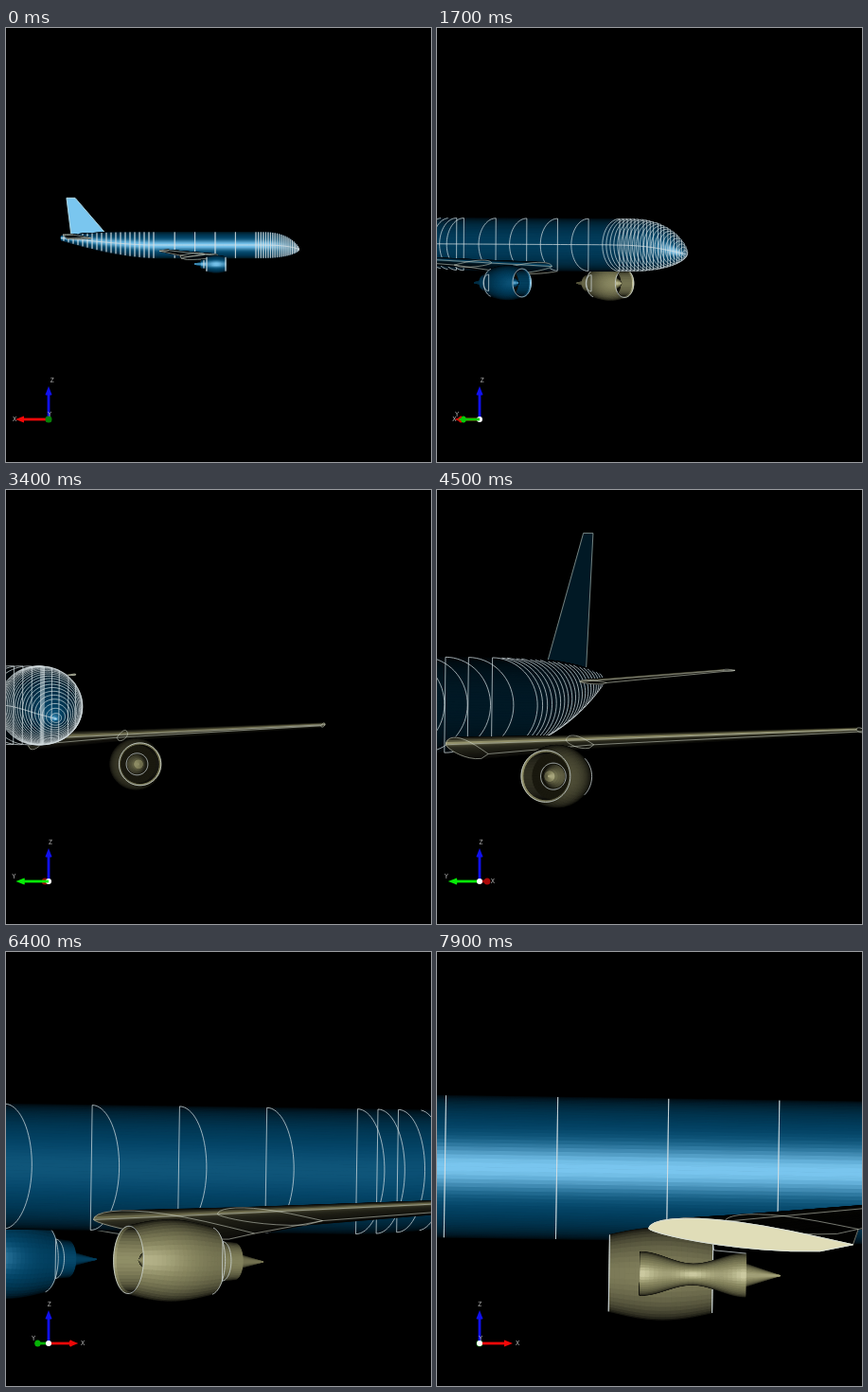
These frames come from a looping animation (449 px wide and 458 px high, 8 s). An HTML page with a canvas:

```html
<!DOCTYPE html>
<html>
<head>
<meta charset="utf-8">
<style>
html, body { margin: 0; width: 100%; height: 100%; overflow: hidden; background: #000; }
canvas { display: block; }
</style>
</head>
<body>
<canvas id="stage" width="449" height="458"></canvas>
<script>
const ctx = document.getElementById('stage').getContext('2d');
const W = 449, H = 458, TAU = Math.PI * 2;
const LINE = 'rgba(215,225,228,.8)', SOFT = 'rgba(215,220,205,.6)';

// A material is a diffuse colour plus a tight highlight, lit from the viewer
const material = (base, shine) => c => {
  c = Math.min(1, Math.abs(c));
  return `rgb(${base.map((b, i) => Math.round(b * c + shine[i] * c ** 20))})`;
};
const BLUE = material([2, 80, 121], [120, 118, 118]);
const SAND = material([152, 150, 106], [55, 55, 58]);
const MATTE = material([122, 120, 86], [10, 10, 8]);
const DARK = material([26, 25, 15], [0, 0, 0]);

let zoom, sn, cs, roll, faces = [];

// Model axes: u to the nose, v to the blue side, z up
function project([u, v, z]) {
  const x = zoom * ((u - 3.5) * cs - (v + 69.8) * sn);
  return [224.5 + x + roll * zoom * z, 229 - zoom * z + roll * x];
}
const depth = ([u, v]) => u * sn + v * cs;
const range = (n, f) => Array.from({ length: n }, (_, i) => f(i));
const minus = (a, b) => a.map((x, i) => x - b[i]);
const cross = (a, b) => [a[1] * b[2] - a[2] * b[1], a[2] * b[0] - a[0] * b[2], a[0] * b[1] - a[1] * b[0]];

function trace(points) {
  ctx.beginPath();
  points.forEach(p => ctx.lineTo(...project(p)));
}
function line(points, color = LINE) {
  trace(points);
  ctx.strokeStyle = color;
  ctx.lineWidth = .9;
  ctx.stroke();
}
function fill(points, color) {
  trace(points);
  ctx.closePath();
  ctx.fillStyle = ctx.strokeStyle = color;
  ctx.lineWidth = 1;
  ctx.fill();
  ctx.stroke();
}

function face(q, paint, cull) {
  const n = cross(minus(q[3], q[1]), minus(q[2], q[0]));
  const c = depth(n) / (Math.hypot(...n) || 1);
  if (cull && c <= 0) return;
  faces.push({ q, color: paint(c), d: q.reduce((s, p) => s + depth(p), 0) });
}
function flush() {
  faces.sort((a, b) => a.d - b.d).forEach(f => fill(f.q, f.color));
  faces = [];
}

// A hoop is [u, half width, centre z, half height]
const onHoop = ([u, r, zc = 0, h = r], t, v0 = 0, z0 = 0) =>
  [u, v0 + r * Math.cos(t), z0 + zc + h * Math.sin(t)];

function revolve(hoops, seg, paint, v0, z0) {
  for (let i = 0; i + 1 < hoops.length; i++)
    for (let j = 0; j < seg; j++) {
      const a = j / seg * TAU, b = (j + 1) / seg * TAU;
      face([onHoop(hoops[i], a, v0, z0), onHoop(hoops[i + 1], a, v0, z0),
        onHoop(hoops[i + 1], b, v0, z0), onHoop(hoops[i], b, v0, z0)], paint, true);
    }
}

// Draws the part of a hoop that faces the viewer
function hoopLine(hoop, slope, v0, z0) {
  const start = cs < 0 ? Math.PI / 2 : -Math.PI / 2;
  const seen = range(73, j => start + j / 72 * TAU)
    .filter(t => Math.cos(t) * cs - slope * sn > -.02);
  if (seen.length > 1) line(seen.map(t => onHoop(hoop, t, v0, z0)));
}

// Fuselage
function body(u) {
  let top = 13.6, bot = -13.8, w = 13.75;
  if (u > 50) {
    const q = Math.min(1, (u - 50) / 39), s = (1 - q ** 2.2) ** .6;
    top = -4.7 + 18.3 * (1 - q ** 2.4) ** .7;
    bot = -4.7 - 9.1 * s;
    w *= s;
  } else if (u < -65) {
    const q = (-65 - u) / 98;
    top -= 4 * q ** 3;
    bot += 19 * q ** 1.6;
    w -= 11.75 * q ** 1.7;
  }
  return [u, w, (top + bot) / 2, (top - bot) / 2];
}
const hull = [...range(21, i => -163 + i * 4.9), ...range(25, i => 50 + 39 * Math.sin(i / 24 * Math.PI / 2))].map(body);
const ribs = [
  ...range(20, i => -160 + i * 5),
  ...range(4, i => (i - 2) * 21.4),
  ...range(23, i => 43 + 46 * (1 - (1 - i / 23) ** 1.35))
];
const seam = range(48, i => body(-163 + i * 252 / 47));

function fuselage() {
  const fin = [[-148, 0, 49.6], [-157, 0, 49.6], [-152, 0, 10], [-116, 0, 12.5]];
  fill(fin, BLUE(cs));
  line([...fin, fin[0]], SOFT);
  revolve(hull, 112, BLUE);
  flush();
  for (const u of ribs) hoopLine(body(u), body(u + .5)[1] - body(u - .5)[1]);
  if (cs > .05) line(seam.map(b => [b[0], b[1], b[0] > 50 ? b[2] : Math.max(0, b[2])]));
}

// Lifting surfaces: sections are [span, leading u, trailing u, leading z, trailing z]
const WING = [[8.5, 3.5, -36, -11.5, -14], [40, -11.2, -37, -9.9, -11], [115.2, -49, -59, -5.8, -6.2]];
const STAB = [[5, -131, -156, 7, 6.8], [42, -150, -161, 10.8, 10.8]];

function airfoil([w, u0, u1, z0, z1], side, thick = 1) {
  const n = 12, size = thick * (u0 - u1) / 40;
  return range(2 * n + 1, i => {
    const x = ((i - n) / n) ** 2;
    const bump = i < n ? 7.5 * Math.sqrt(x) * (1 - x) ** 1.1 : -5.5 * x ** .7 * (1 - x) ** .55;
    return [u0 + (u1 - u0) * x, side * w, z0 + (z1 - z0) * x + size * bump];
  });
}
function loft(sections, side, paint, thick) {
  const outlines = sections.map(s => airfoil(s, side, thick));
  for (let i = 0; i + 1 < outlines.length; i++) {
    const a = outlines[i], b = outlines[i + 1];
    for (let j = 0; j + 1 < a.length; j++) face([a[j], b[j], b[j + 1], a[j + 1]], paint);
  }
  flush();
  outlines.forEach(o => line(o, SOFT));
  [0, 12].forEach(j => line(outlines.map(o => o[j]), SOFT));
}

// Engines
const cowl = range(21, i => [i - 9, 7.4 + 1.5 * Math.sin(i / 20 * Math.PI)]);
const nozzle = [[-22, 0], [-15, 1.8], [-15, 4], [-9, 4.6]];
const duct = [[11, 7.4], [10.6, 7], [3, 6.9]];
const fan = [[3, 6.9], [3, 3]];
const spinner = range(6, i => [3.5 + i, 3.2 * Math.sqrt(1 - i / 5)]);
const core = [[-22, 0], [-15.4, 2.2], ...range(25, i => [-15.4 + i * .85, 3.1 + 1.1 * Math.cos(i / 24 * TAU)]), [5, 0]];

function engine(side, paint, open) {
  const v = side * 41.2, z = -20.2;
  const turn = (hoops, look = paint) => revolve(hoops, 48, look, v, z);
  if (!open) {
    turn(nozzle);
    turn(duct);
    turn(fan, DARK);
    turn(spinner);
  }
  turn(cowl, open ? MATTE : paint);
  flush();
  hoopLine([11, 7.4], sn > .3 ? -9 : 0, v, z);
  hoopLine([-9, 7.4], .24, v, z);
  if (open) {
    turn(core);
    flush();
    line([[1, v, -12.3], [-8.5, v, -12.3], [-9.2, v, -15.5], [-15.4, v, -16]]);
  } else if (Math.abs(cs) > .7) hoopLine([-12, 4.3], 0, v, z);
  else hoopLine([4, 3.8], -9, v, z);
}

function plane(open) {
  const near = cs >= 0 ? 1 : -1;
  const paint = s => s > 0 ? BLUE : SAND;
  const stab = s => loft(STAB, s, paint(s), .35);
  const wing = s => loft(WING, s, paint(s));
  const stabInFront = Math.abs(cs) > .12;
  stab(-near);
  wing(-near);
  if (!open) engine(-near, paint(-near));
  if (!stabInFront) stab(near);
  fuselage();
  if (stabInFront) stab(near);
  if (open) {
    engine(near, SAND, true);
    loft(WING, near, DARK);
    const root = airfoil(WING[0], near);
    fill(root, '#e0ddb8');
    line(root);
  } else {
    wing(near);
    engine(near, paint(near));
  }
}

// Axis marker
function arrow(dx, dy, toward, color) {
  const ox = 45, oy = 413, bx = ox + dx * 26, by = oy + dy * 26;
  ctx.strokeStyle = ctx.fillStyle = color;
  ctx.lineWidth = 2.8;
  ctx.beginPath();
  ctx.moveTo(ox, oy);
  ctx.lineTo(bx, by);
  ctx.stroke();
  ctx.beginPath();
  ctx.moveTo(ox + dx * 35, oy + dy * 35);
  ctx.lineTo(bx - dy * 3.5, by + dx * 3.5);
  ctx.lineTo(bx + dy * 3.5, by - dx * 3.5);
  ctx.fill();
  ctx.beginPath();
  ctx.ellipse(bx, by, dy ? 3.5 : 3.5 * Math.abs(toward), dy ? .5 : 3.5, 0, 0, TAU);
  ctx.fill();
}
function triad(turned) {
  const parts = [
    [-sn, () => arrow(-cs, 0, sn, `rgb(${140 + 105 * Math.abs(cs)},8,8)`)],
    [cs, () => arrow(-sn, 0, cs, `rgb(6,${130 + 110 * sn},6)`)],
    [-.01, () => arrow(0, -1, 0, '#1010f0')],
    [0, () => {
      ctx.fillStyle = '#fff';
      ctx.beginPath();
      ctx.arc(45, 413, 3, 0, TAU);
      ctx.fill();
    }]
  ];
  parts.sort((a, b) => a[0] - b[0]).forEach(p => p[1]());
  ctx.fillStyle = '#b4b4b4';
  ctx.font = '7px "DejaVu Sans Mono", monospace';
  ctx.textAlign = 'center';
  ctx.textBaseline = 'middle';
  if (Math.abs(cs) > .2) ctx.fillText('X', 47 - 38 * cs, 413);
  ctx.fillText('Y', 46 - 38 * sn, 408.5);
  ctx.fillText('Z', 48.5 - 3.4 * turned, 372.5);
}

function draw() {
  const step = Math.floor(performance.now() % 8000 / 100);
  const n = Math.min(step, 75), a = n / 75 * Math.PI;
  zoom = 1 + n * .0596;
  sn = Math.sin(a);
  cs = Math.cos(a);
  roll = .015 * Math.sin(a / 2);
  ctx.fillStyle = '#000';
  ctx.fillRect(0, 0, W, H);
  ctx.lineJoin = 'round';
  plane(step >= 79);
  triad(n / 75);
  requestAnimationFrame(draw);
}
draw();
</script>
</body>
</html>
```
